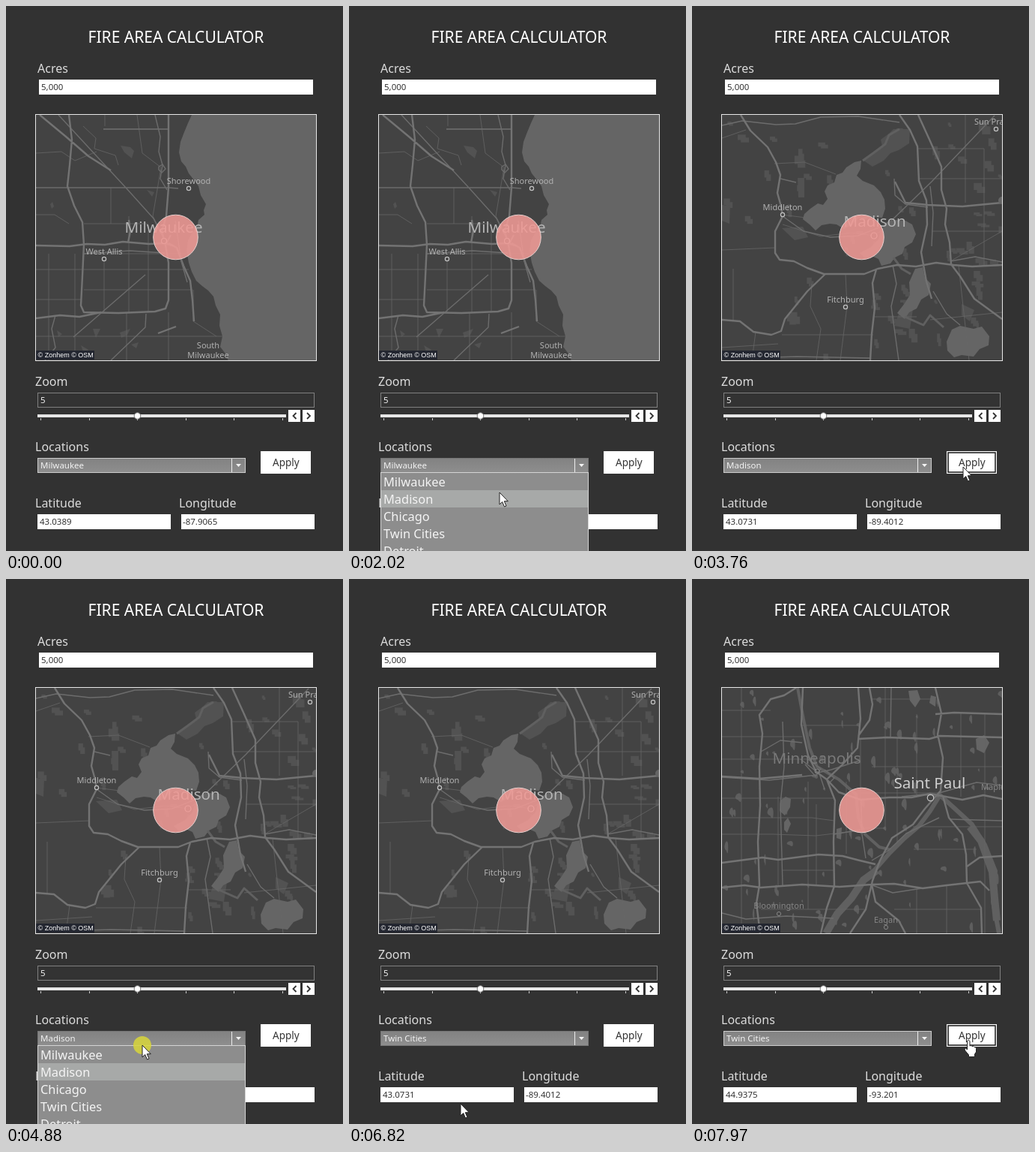
These frames come from a looping animation (450 by 726 pixels, 8 s). An HTML page:

```html
<!DOCTYPE html>
<html lang="en">
<head>
<meta charset="utf-8">
<title>Fire Area Calculator</title>
<style>
  html, body { margin: 0; width: 100%; height: 100%; overflow: hidden; background: #323232; }
  svg { display: block; width: 450px; height: 726px; font-family: "Noto Sans", sans-serif; }
  .label { font-size: 16px; fill: #dcdcdc; }
  .value { font-size: 11.5px; font-weight: 300; fill: #333; }
  .light { fill: #f2f2f2; }
  .item { font-size: 16.4px; font-weight: 300; fill: #f4f4f4; }
  .city { font-size: 20.6px; fill: #b4b4b4; }
  .town { font-size: 11px; font-weight: 500; fill: #b2b2b2; text-anchor: middle; }
  .faint { fill: #858585; }
  .water { fill: #656565; }
  .park { fill: #525252; }
  .road { fill: none; stroke: #737373; stroke-width: 2.4; stroke-linejoin: round; }
  .mid { stroke-width: 1.4; stroke: #6c6c6c; }
  .thin { stroke-width: .8; stroke: #666; }
  .river { fill: none; stroke: #606060; stroke-linejoin: round; }
  .dot { fill: #444; stroke: #c4c4c4; stroke-width: 1.2; }
  .faintDot { fill: none; stroke: #858585; }
</style>
</head>
<body>
<svg viewBox="0 0 450 726">
  <defs>
    <clipPath id="frame"><rect x="40" y="145" width="374" height="327"/></clipPath>
    <linearGradient id="shade" x2="0" y2="1">
      <stop stop-color="#828282"/><stop offset="1" stop-color="#8e8e8e"/>
    </linearGradient>
  </defs>
  <rect width="450" height="726" fill="#323232"/>
  <text x="227" y="49" font-size="21" fill="#fff" text-anchor="middle">FIRE AREA CALCULATOR</text>
  <text class="label" x="42" y="89">Acres</text>
  <rect x="44" y="98" width="366" height="20" fill="#fff"/>
  <text class="value" x="47" y="112">5,000</text>

  <g clip-path="url(#frame)">
    <rect x="39" y="144" width="376" height="329" fill="#434343"/>

    <g class="map">
      <path class="water" d="M248 145L243 156 238 168 233 181 231 195 234 207 240 214 244 223 252 233 257 240 260 252 267 264 264 272 265 278 257 285 255 295 248 303 243 312 241 326 244 342 248 354 254 366 262 373 270 379 277 387 280 399 286 411 285 426 289 440 286 454 293 463 297 473H415V145Z"/>
      <path class="park" d="M153 186L166 188 171 193 168 203 158 195Z M59 264L62 261 64 267 61 270Z M116 430L126 430 120 442Z M152 435L166 430 162 438 154 442Z M68 432L75 437 70 441Z M100 452L110 458 105 466Z M188 245L198 248 195 254Z M167 451L177 448 174 456Z"/>
      <path class="road thin" d="M40 196L74 194 92 206 121 194M132 145V160M103 160L120 176 118 190 146 199 150 212M40 278H65L84 290M130 164H217M175 145L182 196 207 215 196 280 212 310M40 351H104M92 330V472M131 340V408M164 280V408M190 298V408M104 330H240M104 351H244M104 378H249M40 440H290M161 408V472M217 408V472M40 391H100M250 378V420L281 440M104 290H190M140 242V290M57 330V472"/>
      <path class="road mid" d="M40 242H217L230 243M130 164H217M70 145L108 186 160 242 197 283 212 313M90 441L186 358M140 472L186 428 187 410M199 145L206 174 204 194 209 212 206 230 215 245M52 472L66 455 61 430 66 412M104 330L165 326 212 329"/>
      <path class="road" d="M84 145L88 178 85 212 82 240 91 266 102 288 104 318 102 360 100 399 104 408 150 409 199 407 213 403 217 392V342L213 319 208 300 214 280 217 242V145M45 145L80 174 110 200 140 219M40 319L85 320 108 317 132 318 156 314 191 317 212 316M40 416L72 412 98 414 127 408M217 316L228 322 237 346 246 366 249 392 251 420M163 315L166 300 164 285M203 436L227 427M225 320L212 316M213 319L220 305"/>
      <path class="road mid" d="M204 214L209 211 213 217 208 222 204 218ZM226 286L234 340 242 368"/>
      <text class="city" x="158.5" y="302">Milwaukee</text>
      <text class="town" x="244" y="237">Shorewood</text>
      <text class="town" x="131" y="331">West Allis</text>
      <text class="town" x="270" y="456">South</text>
      <text class="town" x="270" y="469">Milwaukee</text>
      <circle class="dot" cx="244" cy="243" r="2.6"/>
      <circle class="dot" cx="131" cy="337" r="2.6"/>
      <circle class="dot" cx="211" cy="313" r="3.5"/>
    </g>

    <g class="map">
      <g id="fields" class="park"></g>
      <path class="park" d="M228 205L243 194 254 187 252 178 263 170 269 164H291L290 183 276 192 265 196 256 206 241 214ZM141 229H150V255H142ZM120 296L148 294 155 308 137 312ZM278 405L296 398 291 430 270 426ZM360 397L377 405 371 420 360 412ZM40 265L51 266 50 290 40 286Z"/>
      <path class="water" d="M148 284L150 277 158 270 168 263 175 265 181 257 177 247 181 239 190 235 193 225 201 222 206 215 217 208 226 206 225 217 220 226 228 233 243 239 252 248 257 258 258 270 254 282 242 281 231 284 223 282 213 292 203 297 193 291 184 290 173 292 165 299 157 291ZM252 299L260 288 271 285 285 286 294 291 299 304 294 315 284 321 281 330 271 335 265 343 253 346 249 337 240 333 231 336 224 329 239 321 249 311ZM298 350L308 348 311 362 319 370 316 385 306 391 300 403 290 408 284 417 274 409 284 396 291 385 290 368ZM347 431L358 426 376 430 387 427 397 440 396 452 384 457 376 467 360 465 350 468 341 459 340 447Z"/>
      <path class="river" stroke-width="3" d="M228 206L242 196 258 184 263 172 277 164M269 335L280 350 292 357M284 414L309 425 318 412 336 428"/>
      <path class="road thin" d="M40 176L72 165M110 210L150 208 192 224M40 325L111 322M55 350V420M120 278L152 282M121 291L172 307 213 302 243 306 262 293M85 434L80 472M160 370L158 400 172 430 166 472M205 357L207 400 198 472M40 455L115 450M120 438H242M244 414H300M318 418L414 408M345 340L414 300M300 190L390 190M303 230H414M320 300H414M365 145V262M390 190V346M356 346L370 472"/>
      <path class="road mid" d="M40 159L67 153 112 158 138 157 172 148 222 147 277 155M121 280L149 300 185 308 222 306 262 290 320 234 404 146M270 230L271 252 285 264 315 268M318 240L322 275 320 320M118 230L139 235M40 470L140 467 238 469M268 345L273 370 266 400 276 472M322 380L340 410 358 425M345 340L378 334 414 341"/>
      <path class="road" d="M65 145L78 166 101 188 112 208 118 225 114 249 119 267 121 280 111 300 111 329 117 338 136 340 154 349 176 357 230 357 248 350 274 345 299 347 326 342 349 345 374 347 414 345M277 145L291 165 301 187 303 233 313 259 314 291 306 328 313 367 320 390M302 145L318 180 333 214 333 245 340 270 338 291 344 315 346 344 358 360 377 390 414 417M271 234L285 262 315 265 361 267 414 262M40 418L64 420 82 434 106 438 119 433 124 417 154 380 178 357M246 351L241 369 244 402 240 437 238 472"/>
      <text class="city" x="202.5" y="294" font-size="20">Madison</text>
      <text class="town" x="121" y="272">Middleton</text>
      <text class="town" x="205" y="395">Fitchburg</text>
      <text class="town" x="377" y="158" style="text-anchor:start">Sun Prairie</text>
      <circle class="dot" cx="121" cy="278" r="2.6"/>
      <circle class="dot" cx="205" cy="401" r="2.6"/>
      <circle class="dot" cx="406" cy="164" r="2.6"/>
      <circle class="dot" cx="243" cy="306" r="4"/>
      <circle cx="414" cy="259" r="5" fill="#656565"/>
    </g>

    <g class="map">
      <g id="ponds" fill="#5e5e5e"></g>
      <path class="water" d="M118 295L125 290 132 293 131 304 124 315 117 309ZM123 324L128 318 132 326 127 338 123 334ZM289 149L301 148 305 160 298 171 291 162ZM319 155L326 157 325 170 317 165ZM379 213L390 208 397 218 390 232 380 227ZM193 333L200 331 199 347 193 345Z"/>
      <path class="river" stroke-width="4" d="M141 145L149 187 157 225 167 250 196 267 219 287 222 318 231 340 250 357 266 361"/>
      <path class="river" stroke-width="10" d="M179 472L194 446 213 425 229 401 247 388"/>
      <path class="river" stroke-width="6" d="M240 392L263 366 283 346 303 329 318 309 331 288 350 305 374 327 391 354 405 389 402 430 410 472"/>
      <path class="river" stroke-width="10" d="M371 330L386 349 401 390 404 425 407 455"/>
      <path class="road thin" d="M40 175H105M40 210H147M40 240H155M40 292H190M40 318H160L190 322M40 340H109L165 342 224 335M66 145V472M115 290V408M155 270V440M166 300V408M206 270V366M225 212V340M258 145V334M226 285H330M226 332H258M240 250H414M300 180V290M274 212V350M359 178V290M391 178V472M295 330H414M296 360H380M300 413V472M92 440H230M270 440H385M340 408V472M240 160H325M120 388H190M147 195H223"/>
      <path class="road mid" d="M40 264L103 268 167 261M121 190L123 250 118 300 120 370 121 408M145 240L168 258 186 254 223 242M226 295L227 340 232 372M190 340L225 334M265 212L266 145M330 285L380 271 414 275M330 290L309 287 280 290M345 320L414 322M92 230L118 215 147 218M169 256L177 280M40 445L72 453 126 449 189 452M241 408L268 418 307 412M240 375L262 362 286 339 330 318M155 240L172 253 165 263 151 247M177 254L190 265 183 272"/>
      <path class="road" d="M139 145L123 155 105 160 90 181 94 206 90 250 91 302 88 350 90 408 86 432 91 472M148 145L146 194 155 235 166 257 180 267 196 284 225 294 263 291 293 291 318 286 339 290 361 294 389 288 414 293M222 145L225 186 221 225 201 247 180 267 191 295 189 350 190 409 180 438 172 472M325 145L333 179 328 207 335 238 332 282 311 306 295 327 267 345 251 375 241 402 232 440 211 472M40 378L94 371 115 374 169 367 201 369 224 375 245 380M40 411L70 408 92 411 147 407 197 410 239 407 270 406 308 412 340 408 385 403 397 415M222 213L260 211 317 213 331 209 414 211M237 145L241 167 237 188 222 209M325 180L350 178 414 180M335 289L343 318 361 340 366 367 367 405 386 438 387 472M40 263L90 266 147 261"/>
      <path class="road" d="M240 407L245 430 276 455 285 472M414 369L384 371 367 383"/>
      <text class="city" x="107.5" y="246" style="fill:#797979">Minneapolis</text>
      <text class="city" x="269.5" y="279" style="fill:#cfcfcf">Saint Paul</text>
      <text class="town faint" x="116" y="439">Bloomington</text>
      <text class="town faint" x="259" y="458">Eagan</text>
      <text class="town faint" x="386" y="281" style="text-anchor:start">Maplewood</text>
      <circle class="dot" cx="318.500" cy="291.500" r="4.2"/>
      <circle class="faintDot" cx="116" cy="446" r="2.6"/>
      <circle class="faintDot" cx="259" cy="464" r="2.6"/>
      <circle class="faintDot" cx="167" cy="256" r="3"/>
    </g>

    <circle cx="226.500" cy="308" r="29.800" fill="#f09a96" fill-opacity=".87" stroke="#e8d0ce"/>
    <rect x="40" y="459" width="78" height="12" fill="#232630"/>
    <text x="42.500" y="468" font-size="9" fill="#fff" font-family="Liberation Sans, sans-serif">© Zonhem © OSM</text>
  </g>
  <rect x="39.500" y="144.500" width="375" height="328" fill="none" stroke="#e8e8e8"/>

  <text class="label" x="39" y="506">Zoom</text>
  <rect x="42.500" y="515.500" width="369" height="19" fill="#333" stroke="#808080"/>
  <text class="value light" x="46" y="529">5</text>
  <path d="M42 546H374" stroke="#e6e6e6" stroke-width="4"/>
  <path d="M46.500 549v3M111.500 549v3M175.500 549v3M240.500 549v3M304.500 549v3M369.500 549v3" stroke="#ccc"/>
  <circle cx="175.500" cy="546" r="4.300" fill="#fff" stroke="#777"/>
  <path d="M377 538h16v16h-16zM396 538h16v16h-16z" fill="#fff"/>
  <path d="M387.500 542l-4 4 4 4M402 542l4 4-4 4" fill="none" stroke="#333" stroke-width="1.800"/>

  <text class="label" x="39" y="593">Locations</text>
  <rect x="340" y="593" width="67" height="30" fill="#fff"/>
  <rect id="ring" x="342" y="595" width="63" height="26" fill="none" stroke="#222" stroke-width="1.600"/>
  <text x="356" y="613" font-size="13.500" fill="#333">Apply</text>

  <text class="label" x="39" y="668">Latitude</text>
  <text class="label" x="231" y="668">Longitude</text>
  <path d="M42 677h178v20H42zM234 677h178v20H234z" fill="#fff"/>
  <text class="value" id="lat" x="45" y="691"></text>
  <text class="value" id="lon" x="236" y="691"></text>

  <rect id="select" x="42.500" y="602.500" width="277" height="19" fill="url(#shade)"/>
  <path d="M301.500 603V621" stroke="#eee"/>
  <path d="M307 610h7l-3.500 4z" fill="#f4f4f4"/>
  <text class="value light" id="choice" x="46" y="616"></text>
  <g id="list">
    <rect x="42.500" y="621.500" width="277" height="110" fill="#8d8d8d" stroke="#d4d4d4"/>
    <rect id="row" x="43" width="276" height="23" fill="#a7a9a8"/>
  </g>

  <circle id="halo" r="12" fill="#d8d63a" fill-opacity=".85"/>
  <g id="cursor" stroke="#222" stroke-linejoin="round">
    <path id="arrow" fill="#fff" d="M0 0V16L3.700 12.500 6.500 19 9 18 6.300 11.700H11.300Z"/>
    <path id="hand" fill="#fff" d="M.5 1.500Q2.300 -1 4 1.500V8Q6 6.500 7 8.500 9 7.500 10 9.500 12.500 9 12.500 11.500V16L10.500 19V22.500H2.500V20L-2.500 14Q-4 11-1.500 11L.5 13Z"/>
  </g>
</svg>
<script>
const $ = id => document.getElementById(id);
const maps = document.querySelectorAll('.map');
const places = ['Milwaukee', 'Madison', 'Chicago', 'Twin Cities', 'Detroit'];
const coords = [['43.0389', '-87.9065'], ['43.0731', '-89.4012'], ['44.9375', '-93.201']];
const clicks = [[1590, 1690], [2280, 2400], [2960, 3020], [4880, 4930], [6130, 6360], [7470, 7530]];
// time, x, y of the pointer tip
const path = [
  [820, 410, 642], [1180, 352, 580], [1590, 190, 616], [1640, 190, 616], [2020, 201, 648],
  [2400, 201, 648], [2940, 362, 614], [4040, 362, 614], [4370, 182, 621], [5340, 182, 621],
  [5570, 151, 668], [5930, 149, 699], [6820, 149, 699], [7400, 367, 614], [8000, 367, 614]
];

function random(seed) {
  return () => (seed = seed * 16807 % 2147483647) / 2147483647;
}

// Scatter small shapes over the map, angular or rounded
function scatter(id, seed, count, size, angular) {
  const rnd = random(seed);
  let d = '';
  for (let i = 0; i < count; i++) {
    const x = 42 + rnd() * 368, y = 148 + rnd() * 320;
    const w = size * (.3 + rnd()), h = size * (.3 + rnd());
    d += angular
      ? `M${x} ${y}h${w}v${h * .6}h${w * .4}v${h}h${-w}v${-h * .5}h${-w * .4}z`
      : `M${x} ${y}q${w} ${-h} ${w} ${h}t${-w * .7} ${h * .6}q${-w} ${-h * .4} ${-w * .3} ${-h * 1.6}z`;
  }
  $(id).innerHTML = `<path d="${d}"/>`;
}
scatter('fields', 71, 65, 9, true);
scatter('ponds', 29, 95, 5, false);

$('list').innerHTML += places.map((p, i) =>
  `<text class="item" x="46" y="${640 + 23 * i}">${p}</text>`).join('');

const show = (el, on) => el.style.display = on ? '' : 'none';
const within = (t, a, b) => t >= a && t < b;

function pointer(t) {
  const i = Math.max(1, path.findIndex(p => p[0] > t));
  const [a, b] = [path[i - 1], path[i]];
  const k = Math.min(1, Math.max(0, (t - a[0]) / (b[0] - a[0])));
  const e = k * k * (3 - 2 * k);
  return [a[1] + (b[1] - a[1]) * e, a[2] + (b[2] - a[2]) * e];
}

function draw() {
  const t = performance.now() % 8000;
  const [x, y] = pointer(t);
  const chosen = t < 2400 ? 0 : t < 6280 ? 1 : 3;
  const open = within(t, 1640, 2400) || within(t, 4880, 6280);
  const focused = within(t, 1590, 2960) || within(t, 4880, 7470);
  const visible = t >= 820;
  const overSelect = visible && x > 42 && x < 320 && y > 602 && y < 622;
  const overApply = x > 340 && x < 407 && y > 593 && y < 623;

  const place = t < 3280 ? 0 : t < 7560 ? 1 : 2;
  const fade = [1, (t - 3280) / 480, (t - 7560) / 400][place];
  maps.forEach((m, i) => {
    show(m, i === place);
    m.style.opacity = Math.min(1, fade);
  });
  [$('lat').textContent, $('lon').textContent] = coords[place];

  $('choice').textContent = places[chosen];
  $('select').setAttribute('stroke', focused || overSelect ? '#777' : '#ccc');
  show($('ring'), within(t, 2960, 4880) || t >= 7470);
  show($('list'), open);
  const hovered = Math.floor((y - 622) / 23);
  $('row').setAttribute('y', 622 + 23 * (hovered < 0 ? chosen : hovered));

  const at = `translate(${x} ${y})`;
  $('halo').setAttribute('transform', at);
  $('cursor').setAttribute('transform', at);
  show($('halo'), clicks.some(([a, b]) => within(t, a, b)));
  show($('cursor'), visible);
  const hand = overApply && !within(t, 3020, 4040);
  show($('hand'), hand);
  show($('arrow'), !hand);
  requestAnimationFrame(draw);
}
draw();
</script>
</body>
</html>
```
